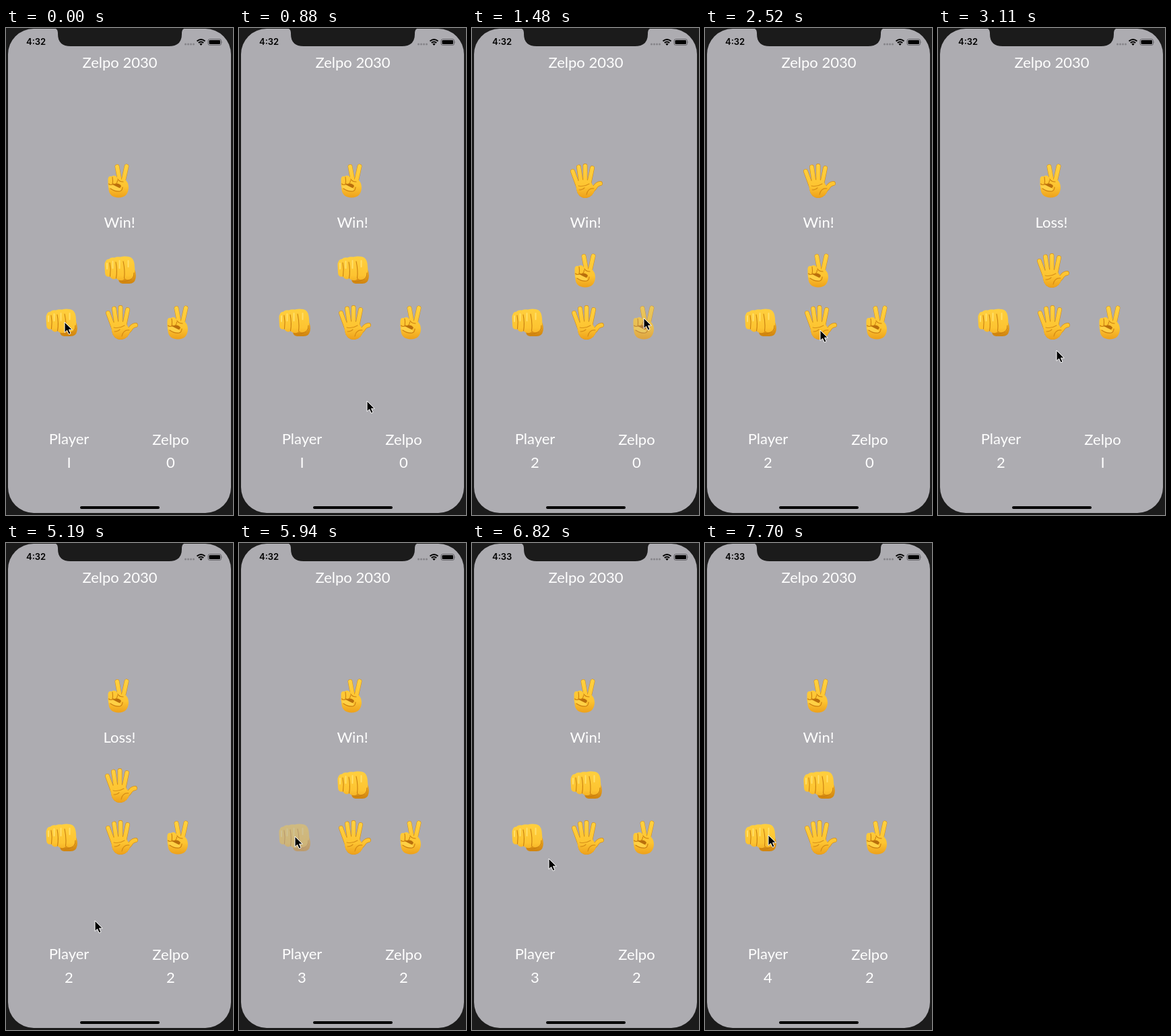
Write an HTML page that moves like this. It is 337 px wide and 722 px high and loops after 7990 ms.

```html
<!DOCTYPE html>
<html lang="en">
<head>
<meta charset="utf-8">
<title>Rock paper scissors</title>
<style>
  html, body { margin: 0; width: 100%; height: 100%; overflow: hidden; background: #1b1b1b; }
  svg { display: block; width: 337px; height: 722px; }
  .label { font: 22px Lato, sans-serif; fill: #fff; text-anchor: middle; }
  .clock { font: 600 13px Inter, sans-serif; }
  .line { fill: none; stroke: #c97e10; stroke-width: 1.1; stroke-linecap: round; }
</style>
</head>
<body>
<svg viewBox="0 0 337 722">
  <defs>
    <linearGradient id="skin" gradientUnits="userSpaceOnUse" x1="0" y1="412" x2="0" y2="462">
      <stop offset="0" stop-color="#ffd140"/>
      <stop offset=".65" stop-color="#fdc431"/>
      <stop offset="1" stop-color="#eda01a"/>
    </linearGradient>
    <linearGradient id="shade" gradientUnits="userSpaceOnUse" x1="0" y1="432" x2="0" y2="458">
      <stop offset="0" stop-color="#f3ae22"/>
      <stop offset="1" stop-color="#cf830e"/>
    </linearGradient>

    <g id="rock">
      <path fill="url(#shade)" d="M84 432H102Q107 440 105.5 449Q104 457 96 457H86Q80 456 80 450Z"/>
      <path fill="url(#skin)" d="M59.5 431Q59 421 66 420.500Q69 417.500 74 418.500Q78 416.500 83 417.500Q88 416 95 417Q102 418 103.500 427Q105 436 103.500 444Q102 452 95 451.500Q91 451 89 449Q87 453 82 452Q78 451.500 76.500 449Q74 451.500 70 449.500Q68 448 67.500 446.500Q60.500 448 60 441Z"/>
      <path class="line" d="M67 426Q69 436 67.500 446M76 425Q78.500 438 76.500 449M87 424Q90 438 88.500 449"/>
      <path class="line" d="M82 453Q91 455 96 451.500Q103 450 103 441"/>
      <path fill="none" stroke="#ffdf6b" stroke-width="2" stroke-linecap="round" d="M63 427V435M71.500 424V434M81.500 423V434M94.500 423V432"/>
    </g>

    <g id="handShape" stroke-linecap="round" stroke-linejoin="round">
      <path fill="none" d="M151.500 422.500L159 443M160.500 416L164 440M170 414.500V440M180.500 417.500L175.500 442M192.500 440.500Q187 441 184 447L176 455"/>
      <path stroke-width="1" d="M156.500 440Q161 435 169 436Q177 435 179.500 441L184 448Q182 461 170 461.500Q160 461 158 451Z"/>
    </g>
    <g id="paper">
      <use href="#handShape" stroke="#d58d14" fill="#d58d14" stroke-width="6.800"/>
      <use href="#handShape" stroke="url(#skin)" fill="url(#skin)" stroke-width="5.600"/>
      <path class="line" stroke-opacity=".75" d="M160 444Q168 446 176 441M183 448Q174 447 172 457M161 450Q166 450 169 447"/>
    </g>

    <g id="scissors">
      <g fill="none" stroke-linecap="round">
        <path stroke="#d58d14" stroke-width="6.800" d="M253 415.500L257.500 440M267 415L261.500 440"/>
        <path stroke="url(#skin)" stroke-width="5.800" d="M253 415.500L257.500 440M267 415L261.500 440"/>
      </g>
      <path fill="url(#skin)" d="M239.500 434Q240 429 245 430Q249 427 252.500 431L255 436L265 435Q270 439 270 447Q269 461.500 255 461.500Q242 461 240.500 450Q239 441 239.500 434Z"/>
      <path fill="#b96f0c" d="M246 442Q255 438 259 444Q258 449 252 446Z"/>
      <path fill="#ffd045" d="M240 446Q241 441 248 443L257 447.500Q260 450 257 452Q251 453 245 449Z"/>
      <path class="line" d="M246 431Q247 437 246 441.500M240.500 441Q244 444 247 441Q253 443 253.500 436M243 448Q250 453 257 452Q261 451 261 446M254 434Q256 438 262 438"/>
    </g>
  </defs>

  <rect width="337" height="722" fill="#1b1b1b"/>
  <rect x="3" y="1" width="331" height="718" rx="38" fill="#adacb1"/>
  <path fill="#1b1b1b" d="M71 0Q77 1 77 7V9Q77 27 96 27H242Q261 27 261 9V7Q261 1 267 0Z"/>
  <rect x="110" y="709" width="118" height="4" rx="2"/>

  <text class="clock" id="clock" x="30" y="25"></text>
  <path d="M266.500 24h.01M270.500 24h.01M274.500 24h.01M278.500 24h.01" stroke="#858489" stroke-width="3" stroke-linecap="round"/>
  <path d="M283.500 19.500Q289.500 14.500 295.500 19.500M285.800 22Q289.500 19 293.200 22" fill="none" stroke="#000" stroke-width="2"/>
  <path d="M287.300 23.600Q289.500 22 291.700 23.600L289.500 26Z"/>
  <rect x="300" y="16.500" width="19.500" height="9" rx="2.500" fill="none" stroke="#656469"/>
  <rect x="301.500" y="18" width="16.500" height="6" rx="1.300"/>
  <path d="M320.500 19.500q1.500 1.500 0 3z" fill="#656469"/>

  <g class="label">
    <text x="169" y="59">Zelpo 2030</text>
    <text x="168.500" y="296" id="result"></text>
    <text x="93.500" y="617">Player</text>
    <text x="244.500" y="618">Zelpo</text>
    <text x="93.500" y="652" id="playerScore"></text>
    <text x="244.500" y="652" id="rivalScore"></text>
  </g>

  <use id="rivalPick"/>
  <use id="playerPick"/>
  <use id="rockButton" href="#rock"/>
  <use id="paperButton" href="#paper"/>
  <use id="scissorsButton" href="#scissors"/>
  <path id="cursor" fill="#000" stroke="#fff" stroke-linejoin="round" d="M0 0V15.500L3.600 12.300L6.200 18L9 16.800L6.500 11.200H11.300Z"/>
</svg>
<script>
const LOOP = 7990, STEP = 148;
const $ = id => document.getElementById(id);

// Distance from each button to the two display slots.
const slots = {
  rivalPick: { rock: [86, -211], paper: [-2, -210], scissors: [-88, -210] },
  playerPick: { rock: [87, -78], paper: [-1, -77], scissors: [-87, -77] }
};

// The result appears one step after each press.
const rounds = [
  { press: -9, player: 'rock', rival: 'scissors', result: 'Win!', score: [1, 0] },
  { press: 8, player: 'scissors', rival: 'paper', result: 'Win!', score: [2, 0] },
  { press: 18, player: 'paper', rival: 'scissors', result: 'Loss!', score: [2, 1] },
  { press: 29, player: 'paper', rival: 'scissors', result: 'Loss!', score: [2, 2] },
  { press: 39, player: 'rock', rival: 'scissors', result: 'Win!', score: [3, 2] },
  { press: 49, player: 'rock', rival: 'scissors', result: 'Win!', score: [4, 2] }
];
const fade = [.2, .42, .75];

// Cursor stops: step, x, y.
const path = [
  [0, 87, 436], [1, 88, 442], [3, 120, 520], [5, 190, 553], [7, 250, 465], [8, 255, 431],
  [10, 255, 430], [11, 255, 440], [13, 250, 525], [14, 222, 520], [16, 173, 455], [17, 171, 448],
  [19, 171, 448], [21, 176, 478], [23, 178, 487], [25, 175, 470], [28, 166, 443], [30, 166, 443],
  [32, 174, 475], [33, 176, 510], [34, 162, 552], [35, 132, 560], [36, 100, 500], [37, 83, 435],
  [40, 83, 435], [42, 90, 450], [44, 112, 466], [46, 114, 468], [48, 95, 437], [49, 94, 433], [54, 94, 433]
];

function cursorAt(step) {
  const i = path.findIndex(stop => stop[0] > step);
  if (i < 0) return path[path.length - 1].slice(1);
  const [s0, x0, y0] = path[i - 1], [s1, x1, y1] = path[i];
  const k = (step - s0) / (s1 - s0);
  return [x0 + (x1 - x0) * k, y0 + (y1 - y0) * k];
}

function move(id, [x, y]) {
  $(id).setAttribute('transform', `translate(${x} ${y})`);
}

function showPick(slot, sign) {
  $(slot).setAttribute('href', '#' + sign);
  move(slot, slots[slot][sign]);
}

// The numeral one is a plain bar.
const numeral = n => n === 1 ? 'I' : n;

function draw(time) {
  const step = Math.floor(time % LOOP / STEP);
  const round = rounds.filter(r => r.press < step).pop();
  showPick('rivalPick', round.rival);
  showPick('playerPick', round.player);
  $('result').textContent = round.result;
  $('playerScore').textContent = numeral(round.score[0]);
  $('rivalScore').textContent = numeral(round.score[1]);
  $('clock').textContent = step < 44 ? '4:32' : '4:33';
  for (const sign of ['rock', 'paper', 'scissors']) {
    const pressed = rounds.find(r => r.player === sign && fade[step - r.press]);
    $(sign + 'Button').setAttribute('opacity', pressed ? fade[step - pressed.press] : 1);
  }
  move('cursor', cursorAt(step));
}

const start = performance.now();
function tick() {
  draw(performance.now() - start);
  requestAnimationFrame(tick);
}
tick();
</script>
</body>
</html>
```
